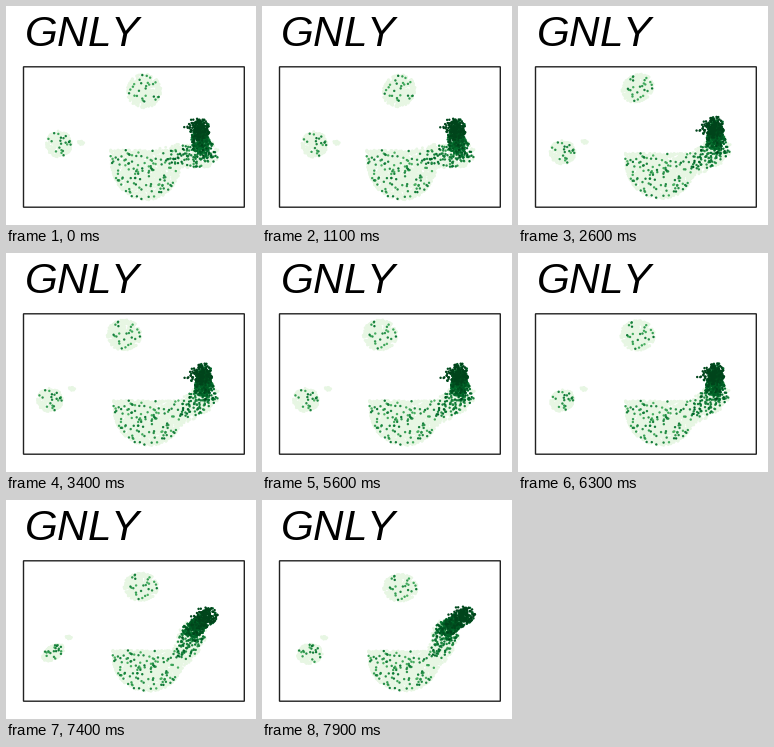
A matplotlib script that plays this animation: 250 px wide and 219 px high, repeating every 8000 ms.

```python
import numpy as np
import matplotlib.pyplot as plt
from matplotlib.animation import FuncAnimation
from matplotlib.patches import Rectangle

W, H, DPI = 250, 219, 100
PX = 72 / DPI  # points per pixel
FRAMES, STEPS, FIRST, SECOND = 80, 30, 4, 55
PALE = 0.11  # colour level of cells without expression

# Cells sit in three layouts in turn; islands get flatter from one to the next.
SQUASH = (1, 0.9, 0.8)

# The dense arm follows a bent spine: lower end, elbow, neck, head, tip.
SPINES = [
    [(155, 151), (200, 149), (193, 132), (197, 120), (181, 120)],
    [(172, 163), (200, 143), (197, 130), (199, 117), (181, 125)],
    [(174, 158), (184, 133), (187, 126), (208, 114), (189, 113)],
]
ARM_WIDTH = [10, 13, 8, 8, 6]

plt.rcParams.update({"mathtext.fontset": "custom",
                     "mathtext.it": "Liberation Sans:italic"})
rng = np.random.default_rng(11)


def disc(n):
    r, t = np.sqrt(rng.random(n)), 2 * np.pi * rng.random(n)
    return np.column_stack([r * np.cos(t), r * np.sin(t)])


def shield(n):
    """Points below a flat top edge, narrowing to a round bottom."""
    u, v = rng.uniform(-1, 1, (2, 2 * n))
    inside = np.abs(u) < np.sqrt(1 - ((v + 1) / 2) ** 2.5)
    return np.column_stack([u, v])[inside][:n]


def island(centers, rx, ry, marked, shape=disc, flipped=None):
    """One island in all layouts; it is mirrored in the flipped layout."""
    uv = shape(int(1.6 * rx * ry) + marked)
    level = np.full(len(uv), PALE)
    level[:marked] = rng.uniform(0.58, 0.84, marked)
    places = []
    for k, center in enumerate(centers):
        p = -uv[:, ::-1] if k == flipped else uv
        places.append(p * (rx, ry * SQUASH[k]) + center)
    return places, level


def arm(s, level, spread=1.0):
    """Cells around the spine, s counting its key points."""
    keys = np.arange(len(ARM_WIDTH))
    offset = disc(len(s)) * spread * np.interp(s, keys, ARM_WIDTH)[:, None]
    places = [offset + np.column_stack([np.interp(s, keys, axis) for axis in zip(*spine)])
              for spine in SPINES]
    return places, level


def ease(t):
    """Cubic in and out, clamped to 0..1."""
    t = min(max(t, 0), 1)
    return 4 * t ** 3 if t < 0.5 else 1 - 4 * (1 - t) ** 3


s = rng.triangular(0, 2.2, 4, 620)
groups = [
    island([(140, 169), (143, 170), (142, 171)], 36, 25, 110, shape=shield),
    island([(138, 85), (118, 82), (139, 88)], 17, 17, 26, flipped=0),
    island([(53, 138), (44, 147), (48, 154)], 13, 13, 21, flipped=2),
    island([(74, 137), (65, 136), (61, 138)], 4, 2, 0),
    arm(rng.uniform(0, 1.2, 380), np.full(380, PALE), 1.1),
    arm(s, np.clip(0.74 + 0.08 * s + rng.normal(0, 0.06, s.size), 0.6, 1)),
]
level = np.concatenate([g[1] for g in groups])
order = np.argsort(level, kind="stable")  # strongest expression on top
level = level[order]
start, middle, end = (np.vstack(p)[order] for p in zip(*(g[0] for g in groups)))

fig = plt.figure(figsize=(W / DPI, H / DPI), dpi=DPI, facecolor="white")
ax = fig.add_axes([0, 0, 1, 1])
ax.set_xlim(0, W)
ax.set_ylim(H, 0)
ax.axis("off")
# The braces switch off kerning before the last letter.
ax.text(18, 40, "$GNL{Y}$", size=42.3 * PX, va="baseline")
ax.add_patch(Rectangle((17.5, 60.8), 220.8, 140.4, fill=False, ec="#222222",
                       lw=1.4 * PX, snap=False))
dots = ax.scatter(*start.T, s=np.where(level == PALE, 2.8 * PX, 2.4 * PX) ** 2,
                  c=plt.cm.Greens(level), linewidths=0)


def draw(i):
    p = ease((i - FIRST) / STEPS)
    q = ease((i - SECOND) / STEPS)
    dots.set_offsets(start + p * (middle - start) + q * (end - middle))
    return (dots,)


anim = FuncAnimation(fig, draw, frames=FRAMES, interval=100, repeat=True, repeat_delay=0)
plt.show()
```
